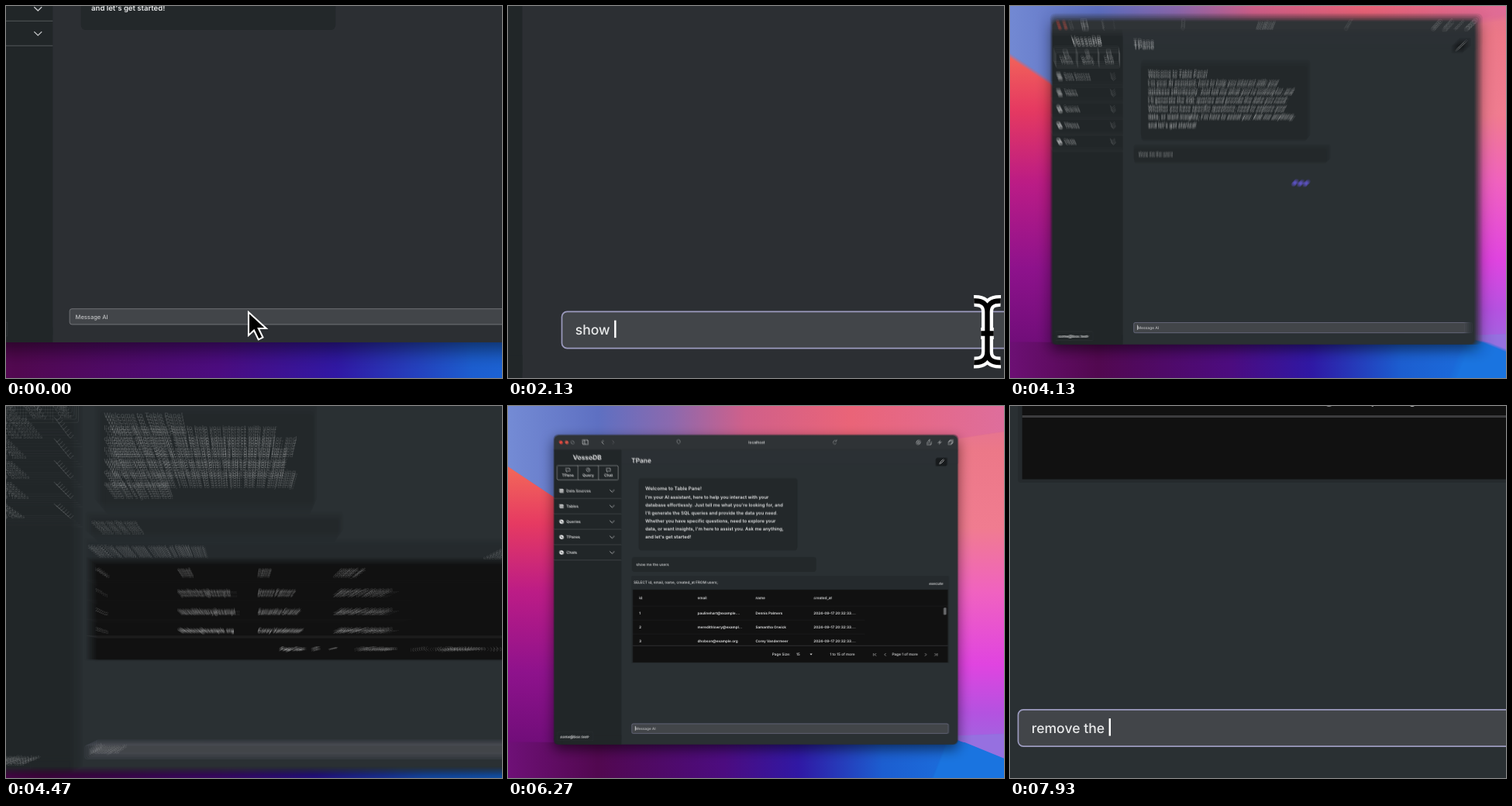
An HTML page that plays this animation: 640 by 480 pixels, repeating every 8000 ms.

```html
<!DOCTYPE html>
<html lang="en">
<head>
<meta charset="utf-8">
<title>Database chat</title>
<style>
  html, body { margin: 0; width: 100%; height: 100%; overflow: hidden; background: #2b3034; }
  svg { display: block; width: 100vw; height: 100vh; }
  text { font-family: Inter, "Open Sans", sans-serif; white-space: pre; text-rendering: geometricPrecision; }
</style>
</head>
<body>
<svg id="stage" viewBox="0 0 640 480" preserveAspectRatio="none">
  <defs>
    <linearGradient id="left" x2="0" y2="1">
      <stop offset=".2" stop-color="#f2655a"/><stop offset=".33" stop-color="#e63a62"/>
      <stop offset=".5" stop-color="#bc1c86"/><stop offset=".7" stop-color="#8e128c"/>
      <stop offset="1" stop-color="#5c0a6c"/>
    </linearGradient>
    <linearGradient id="right" x2="0" y2="1">
      <stop offset="0" stop-color="#dd6fa0"/><stop offset=".15" stop-color="#ec7888"/>
      <stop offset=".34" stop-color="#f07c90"/><stop offset=".5" stop-color="#f062c0"/>
      <stop offset=".68" stop-color="#e044e0"/><stop offset=".8" stop-color="#b452e0"/>
      <stop offset=".92" stop-color="#9670e0"/>
    </linearGradient>
    <linearGradient id="fade"><stop offset=".45" stop-color="#000"/><stop offset=".9" stop-color="#fff"/></linearGradient>
    <mask id="fadeMask"><rect x="-20" y="-20" width="680" height="520" fill="url(#fade)"/></mask>
    <linearGradient id="top">
      <stop offset="0" stop-color="#7890d8"/><stop offset=".2" stop-color="#5e70c2"/>
      <stop offset=".34" stop-color="#8c69ae"/><stop offset=".48" stop-color="#d0608a"/>
      <stop offset=".68" stop-color="#ea6478"/><stop offset="1" stop-color="#dd6fa0"/>
    </linearGradient>
    <linearGradient id="bottom">
      <stop offset="0" stop-color="#74127e"/><stop offset=".2" stop-color="#520850"/>
      <stop offset=".44" stop-color="#4c0c80"/><stop offset=".58" stop-color="#3018a4"/>
      <stop offset=".74" stop-color="#1c5ed0"/><stop offset="1" stop-color="#1a7ce8"/>
    </linearGradient>
    <filter id="soft" x="-20%" y="-20%" width="140%" height="140%"><feGaussianBlur stdDeviation="8"/></filter>
    <g id="world"></g>
  </defs>
</svg>
<script>
const $ = id => document.getElementById(id);
const stage = $('stage'), world = $('world');
const LOOP = 8000, COPIES = 7, SHUTTER = 28;

// ---- markup helpers ----
const rect = (x, y, w, h, fill, r = 0, more = '') =>
  `<rect x="${x}" y="${y}" width="${w}" height="${h}" rx="${r}" fill="${fill}" ${more}/>`;
const path = (d, stroke = '#d8dadc', w = .7, more = '') =>
  `<path d="${d}" fill="none" stroke="${stroke}" stroke-width="${w}" ${more}/>`;
const dot = (x, y, r, fill, more = '') => `<circle cx="${x}" cy="${y}" r="${r}" fill="${fill}" ${more}/>`;
// y is the optical middle of the line
const text = (x, y, str, size = 4.7, weight = 500, more = '') =>
  `<text x="${x}" y="${y + size * .36}" font-size="${size}" font-weight="${weight}" fill="#e8e9ea" ${more}>${str}</text>`;
const mid = 'text-anchor="middle"';

function wallpaper() {
  return rect(-20, -20, 680, 520, 'url(#left)')
    + rect(-20, -20, 680, 520, 'url(#right)', 0, 'mask="url(#fadeMask)"')
    + '<path d="M-20-20H660V30Q420 60 300 140L60 118L0 78L-20 65Z" fill="url(#top)"/>'
    + rect(-20, 434, 680, 66, 'url(#bottom)')
    + '<path d="M570 426L660 463V422Z" fill="#9670e0"/>'
    + '<path d="M570 427L660 463V500H540Z" fill="#1a74e0"/>';
}

function titleBar() {
  return rect(59, 37, 522, 26, '#2f3336', 6)
    + dot(68, 46.5, 2.3, '#e8493f') + dot(75.5, 46.5, 2.3, '#d3564a')
    + dot(83, 46.5, 2, 'none', 'stroke="#8a8d90" stroke-width=".7"')
    + path('M96 43.5h7v5.5h-7zM98.6 43.5v5.5M123.2 43.8l-2.4 2.5 2.4 2.5')
    + path('M134.3 43.8l2.4 2.5-2.4 2.5', '#6b6e71')
    + path('M218 44l2-1 2 1v2.5l-2 2-2-2zM424 45a2.3 2.3 0 1 0 0 2.6M424.3 43v2h-2', '#a0a3a5', .6)
    + text(321, 46.5, 'localhost', 4.8, 600, mid)
    + dot(530, 46.5, 2.6, 'none', 'stroke="#c8cacc" stroke-width=".7"')
    + path('M530 45v2.4M528.8 46.4l1.2 1.2 1.2-1.2M541.5 45.5v4h5v-4M544 47.5v-4.5M542.6 44.3l1.4-1.3 1.4 1.3M555 46.5h5M557.5 44v5M569 45h4v4h-4zM570.5 45v-1.5h4v4h-1.5', '#c8cacc');
}

function sidebar() {
  const tabs = ['TPane', 'Query', 'Chat'], rows = ['Data Sources', 'Tables', 'Queries', 'TPanes', 'Chats'];
  let s = rect(59, 56, 87, 375, '#212628') + rect(59, 425, 20, 12, '#212628', 5) + rect(69, 425, 77, 12, '#212628')
    + text(102, 66, 'VossoDB', 8.4, 700, mid)
    + path('M64.5 76.5h76a1.5 1.5 0 0 1 1.5 1.5v15.5a1.5 1.5 0 0 1-1.5 1.5h-76a1.5 1.5 0 0 1-1.5-1.5v-15.5a1.5 1.5 0 0 1 1.5-1.5zM90 76.5v18.5M116.5 76.5v18.5', '#a9acae', .6);
  tabs.forEach((name, i) => {
    const x = 77 + i * 26.2;
    s += text(x, 89, name, 5, 600, mid);
    s += i == 1 ? dot(x, 82, 2.3, 'none', 'stroke="#d8dadc" stroke-width=".6"') + path(`M${x} 80.6v1.6h1.2`, '#d8dadc', .5)
      : path(`M${x - 2.5} 80h5v3.6h-3l-1.4 1.3v-1.3h-.6z`, '#d8dadc', .6);
  });
  rows.forEach((name, i) => {
    const y = 109.2 + i * 19.9;
    s += i < 2 ? rect(66, y - 2.5, 5.4, 5, '#e2e3e4', .8) + path(`M66 ${y - .5}h5.4M66 ${y + 1.2}h5.4`, '#212628', .5)
      : dot(68.8, y, 2.8, '#e2e3e4') + dot(68.8, y, .8, '#212628');
    s += text(75, y, name, 4.9, 600) + path(`M131 ${y - 1.5}l3.1 3 3.1-3`, '#c9cbcd', .8)
      + path(`M59 ${y + 9.8}h87`, '#55595c', .6);
  });
  return s + path('M63.5 421v11h46v-11z', '#33383b', .5) + text(67, 427, 'some@box.test', 4.8, 600)
    + path('M102.2 426.3l1.2 1.3 1.2-1.3', '#d8dadc', .5);
}

function welcome() {
  const lines = ["I'm your AI assistant, here to help you interact with your",
    "database effortlessly. Just tell me what you're looking for, and",
    "I'll generate the SQL queries and provide the data you need.",
    'Whether you have specific questions, need to explore your',
    'data, or want insights, I\'m here to assist you. Ask me anything,',
    "and let's get started!"];
  return text(159, 70, 'TPane', 8.4, 600)
    + rect(552.5, 66.5, 14.5, 10.5, '#171a1c', 2) + path('M557.6 74l.5-1.8 3.6-3.6 1.3 1.3-3.6 3.6z', '#e8e9ea', .7)
    + rect(168.6, 93, 204.8, 93, '#23282a', 4)
    + text(177, 106, 'Welcome to Table Pane!', 6.3, 600)
    + lines.map((l, i) => text(177, 117.3 + i * 10.25, l, 5.95, 600)).join('');
}

function result() {
  const cols = [169, 244.5, 319.5, 394.6];
  const data = [['id', 'email', 'name', 'created_at'],
    ['1', 'paulinehart@example....', 'Dennis Palmers'],
    ['2', 'meredithlowry@exampl...', 'Samantha Orwick'],
    ['3', 'dhobson@example.org', 'Corey Vandermeer']];
  let s = rect(159.5, 219.5, 409.5, 112.5, '#252a2d', 1)
    + text(162, 227.5, 'SELECT id, email, name, created_at FROM users;')
    + text(562, 229, 'execute', 4.8, 500, 'text-anchor="end"')
    + rect(161, 237, 407, 93.8, '#111');
  data.forEach((row, i) => {
    const y = i ? 249.1 + i * 18 : 247.6;
    if (i) row.push('2024-09-17 20:32:33....');
    row.forEach((c, k) => s += text(cols[k], y, c, 4.65, 600));
  });
  return s + path('M161 258h407M161 276.1h300M161 294.1h300', '#2b2b2c', .5) + path('M161 309.2h407', '#3c3c3e', .8)
    + rect(562.5, 260, 3.6, 9.5, '#6c6d6f', 1.5)
    + text(341, 320.5, 'Page Size:') + text(372.2, 320.5, '15')
    + '<path d="M389.7 319.6h3.2l-1.6 1.9z" fill="#eee"/>'
    + text(415.6, 320.5, '1 to 15 of more') + text(496, 320.5, 'Page 1 of more')
    + path('M472 319v3.6M475.4 319l-1.8 1.8 1.8 1.8M488 319l-1.8 1.8 1.8 1.8M538.5 319l1.8 1.8-1.8 1.8M551 319l1.8 1.8-1.8 1.8M554.3 319v3.6', '#e0e0e0', .6);
}

const beam = 'M-4.6-10.6Q0-10.8 0-6.8V6.8Q0 10.8-4.6 10.6M4.6-10.6Q0-10.8 0-6.8V6.8Q0 10.8 4.6 10.6M-2.2.6H2.2';

world.innerHTML = wallpaper()
  + rect(59, 43, 522, 400, '#0008', 6, 'filter="url(#soft)"')
  + rect(59, 37, 522, 400, '#2c2f33', 6, 'id="page"')
  + titleBar() + rect(146, 56, 435, 18, '#2b3034') + sidebar() + welcome()
  + `<g id="sent">${rect(160, 195, 237.6, 18.6, '#23282a', 3)}${text(165.3, 204.4, 'show me the users')}</g>`
  + `<g id="loading">${[0, 1, 2].map(i => dot(356.8 + i * 7, 239, 2.8, '#6a5ce6')).join('')}</g>`
  + `<g id="result">${result()}</g>`
  + rect(159.6, 410.1, 409.2, 12.6, '#424549', 1.8, 'id="box" stroke-width=".45"')
  + text(164.2, 416.4, 'Message AI', 4.7, 500, 'id="hint" opacity=".75"')
  + text(164.2, 416.4, '', 4.7, 500, 'id="typed"')
  + rect(164.2, 413.1, .65, 6, '#fff', 0, 'id="caret"')
  + '<path id="arrow" d="M303.4 412.8v18.6l4.4-4 3.6 7.4 3.5-1.7-3.5-7.2h6.2z" fill="#000" stroke="#fff" stroke-width="1.3"/>'
  + `<g id="beam" transform="translate(306 417)">${path(beam, '#fff', 4)}${path(beam, '#000', 1.7)}</g>`;

const copies = Array.from({ length: COPIES }, (_, i) => {
  const u = document.createElementNS('http://www.w3.org/2000/svg', 'use');
  u.setAttribute('href', '#world');
  u.setAttribute('opacity', 1 / (i + 1));
  return stage.appendChild(u);
});

// ---- camera: start, duration, scale, x, y ----
const wide = [.982, 5.4, 6.1];
const moves = [
  [0, 1400, 3.75, -790, -1143.5],
  [450, 1220, 3.75, -529, -1143.5],
  [3740, 580, ...wide],
  [4340, 860, 2.05, -319, -358],
  [5870, 540, ...wide],
  [6617, 983, 3.75, -588, -1146]
];
const spring = x => 1 - (1 + x) * Math.exp(-x);
const ease = u => spring(8 * Math.min(1, Math.max(0, u))) / spring(8);
const camera = t => moves.reduce((c, [at, dur, ...to]) => {
  const k = ease((t - at) / dur);
  return c.map((v, i) => v + (to[i] - v) * k);
}, [1.605, -174, -267.5]);

// ---- typing: first key, last key, keys ----
const first = [[1790, 2120, 5], [2330, 2900, 3], [3260, 3590, 9]];
const second = [[6600, 7550, 7], [7660, 7920, 4]];
const keys = (t, runs) => runs.reduce((sum, [a, b, n]) =>
  sum + (t < a ? 0 : Math.min(n, Math.floor((t - a) / (b - a) * (n - 1)) + 1)), 0);

const show = (id, on) => $(id).setAttribute('display', on ? 'inline' : 'none');
let last = '';

function drawState(t) {
  const sent = t >= 3740, ready = t >= 4330, focus = t >= 700;
  const str = sent ? 'remove the '.slice(0, keys(t, second)) : 'show me the users'.slice(0, keys(t, first));
  const cursor = t < 400 ? 'arrow' : t < 2600 ? 'beam' : '';
  const state = [sent, ready, focus, str, cursor].join();
  if (sent && !ready) [...$('loading').children].forEach((c, i) =>
    c.setAttribute('cy', 239 - .8 * Math.sin(t / 110 - i)));
  if (state === last) return;
  last = state;
  show('sent', sent);
  show('loading', sent && !ready);
  show('result', ready);
  show('hint', !str);
  show('caret', focus);
  show('arrow', cursor === 'arrow');
  show('beam', cursor === 'beam');
  $('page').setAttribute('fill', sent ? '#2a3033' : '#2c2f33');
  $('box').setAttribute('stroke', focus ? '#9c9bbf' : '#85868a');
  $('typed').textContent = str;
  const width = str ? $('typed').getComputedTextLength() : 0;
  $('caret').setAttribute('x', 164.2 + width + (str ? .2 : -.3));
}

function draw(t) {
  drawState(t);
  const a = camera(t - SHUTTER / 2), b = camera(t + SHUTTER / 2);
  const moving = t > 35 && a.some((v, i) => Math.abs(v - b[i]) > (i ? .7 : .002));
  copies.forEach((u, i) => {
    u.setAttribute('display', moving || !i ? 'inline' : 'none');
    if (i && !moving) return;
    const [s, x, y] = camera(moving ? t + SHUTTER * (i / (COPIES - 1) - .5) : t);
    u.setAttribute('transform', `translate(${x} ${y}) scale(${s})`);
  });
}

const begin = performance.now();
function tick() {
  draw((performance.now() - begin) % LOOP);
  requestAnimationFrame(tick);
}
tick();
</script>
</body>
</html>
```
